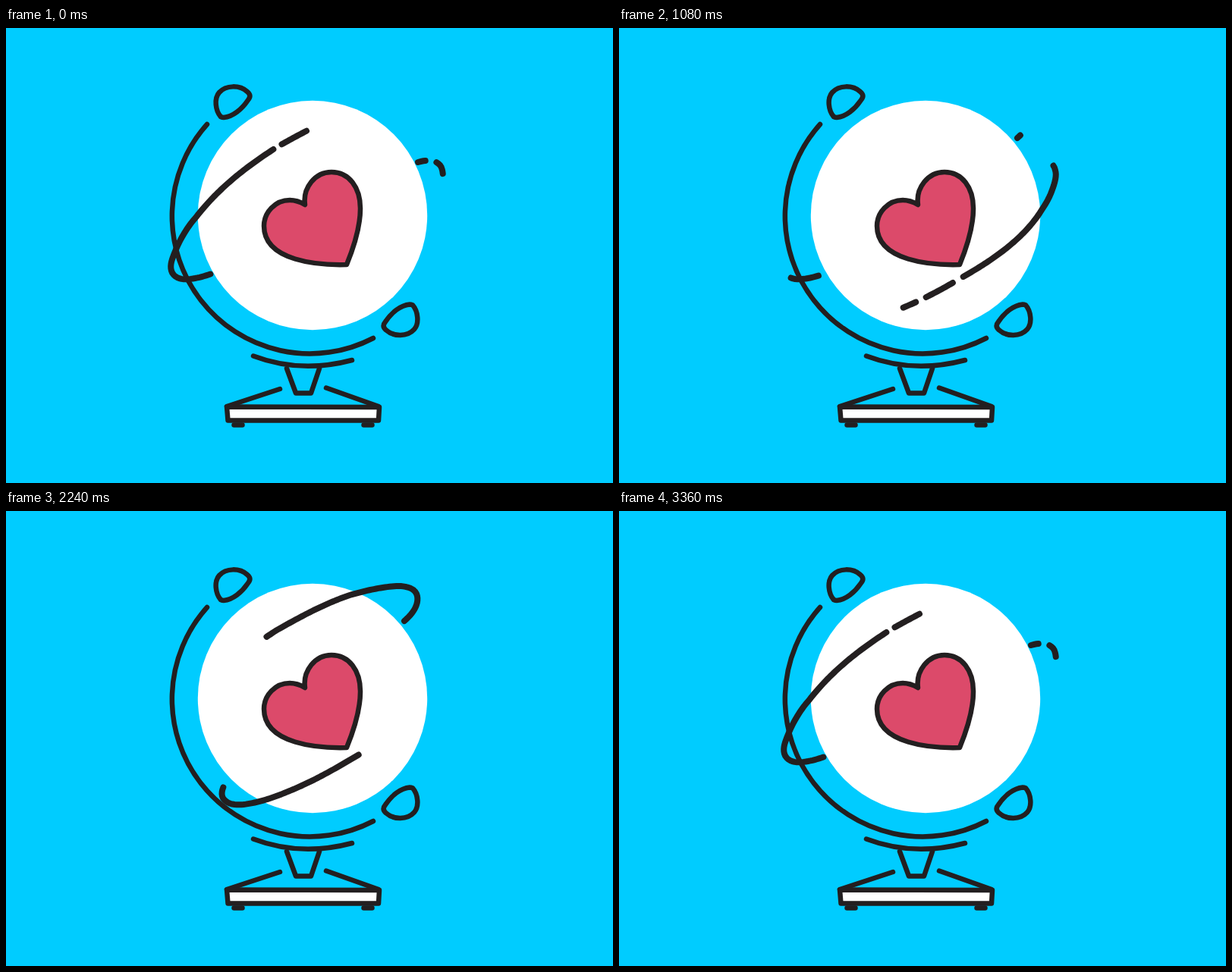
Write an HTML page that moves like this. It is 800 by 600 pixels and loops after 3.4 s.

```html
<!DOCTYPE html>
<html lang="en">
<head>
<meta charset="utf-8">
<title>Heart globe</title>
<style>
  html, body { margin: 0; width: 100%; height: 100%; overflow: hidden; background: #00ccff; }
  svg { display: block; width: 800px; height: 600px; }
  .line { fill: none; stroke: #231f20; stroke-width: 6.5; stroke-linecap: round; stroke-linejoin: round; }
  .orbit { stroke-width: 8; }
  .love { fill: #dc4a6a; }
</style>
</head>
<body>
<svg viewBox="0 0 800 600">
  <rect width="800" height="600" fill="#00ccff"/>
  <circle cx="404" cy="247" r="151.2" fill="#fff"/>
  <g class="line">
    <path d="M265 127A181.500 181.500 0 0 0 484 409"/>
    <path id="knob" d="M283 117C276 109 274 93 281 85C290 75 308 75 318 84Q324 89 319 95C311 107 299 117 287 118Q285 118 283 117Z"/>
    <use href="#knob" transform="rotate(180 409.5 241.2)"/>
    <path d="M326 432.500Q388 456 456 438"/>
    <path d="M370 449L382 481.500H402L413 449"/>
    <path d="M361 476L291 499M422 474.500L491 499"/>
    <path d="M291 499.500L492 500L491 517.500H292.500Z" fill="#fff"/>
    <path d="M300.500 523.500H311.500M471.500 523.500H482.500"/>
  </g>
  <g id="heart">
    <path class="line love" d="M394 233C391 211 407 190 429 190C452 190 467 210 467 238C467 264 458 290 449 312C413 313 340 308 340 261C340 243 355 227 374 227C382 227 389 230 394 233Z"/>
  </g>
  <path id="over" class="line orbit"/>
  <path id="under" class="line orbit"/>
</svg>
<script>
const FRAME = 40, LOOP = 3400, SPIN = 1680, BEAT = 560;
const byId = id => document.getElementById(id);

const progress = (t, start, span) => Math.min(1, Math.max(0, (t - start) / span));
const easeInOut = u => u * u * (3 - 2 * u);
const easeOut = u => 1 - (1 - u) ** 1.3;

// A track whose visible part is a list of [from, to] lengths
function makeTrack(id, d) {
  const el = byId(id);
  const guide = document.createElementNS("http://www.w3.org/2000/svg", "path");
  guide.setAttribute("d", d);
  const length = guide.getTotalLength();

  function piece([from, to]) {
    const a = Math.max(0, from), b = Math.min(length, to);
    if (b - a < 0.5) return "";
    const steps = Math.ceil((b - a) / 3), out = [];
    for (let i = 0; i <= steps; i++) {
      const p = guide.getPointAtLength(a + (b - a) * i / steps);
      out.push(p.x.toFixed(2) + " " + p.y.toFixed(2));
    }
    return "M" + out.join("L");
  }

  return { length, draw: pieces => el.setAttribute("d", pieces.map(piece).join("")) };
}

const over = makeTrack("over",
  "M271 324C254 330 241 332 232 331C220 329 214 320 219 305C224 290 234 268 250 250" +
  "C281 210 318 182 357 157C388 139.5 420 122 453 111C473 105 500 99 519 99" +
  "C538 100 544 108 542 120C540 130 533 138 525 145");

const under = makeTrack("under",
  "M292 355C285 364 282 374 287 380C293 387 302 388 313 387C330 385 350 379 369 371" +
  "C397 360 425 345 450 330C495 305 535 276 557 240C563 231 567 224 570 216" +
  "C575 203 577 194 575 188C574 182 571 179 567 177C560 174 553 174 543 177");

// One dash runs ahead of the stroke
function overPieces(t) {
  const tip = 0.465 * (t - 982);
  const tail = over.length * easeInOut(progress(t, 1640, 1190));
  return [[tail, tip - 50], [tip - 37, tip]];
}

// Two dashes trail behind the stroke
function underPieces(t) {
  const head = under.length * easeOut(progress(t, 1762, 1150));
  const tail = (under.length + 89) * easeInOut(progress(t, 2110, 1515));
  return [[tail, head], [tail - 56, tail - 16], [tail - 89, tail - 71]];
}

// A strong beat followed by a weak one
function heartScale(t) {
  const phase = (t + 20) % BEAT, half = BEAT / 2;
  const away = Math.min(phase % half, half - phase % half);
  const strong = phase < half / 2 || phase >= BEAT - half / 2;
  return 0.835 + (strong ? 0.165 : 0.083) * (1 - easeInOut(progress(away, 40, 60)));
}

function render(t) {
  const turns = [0, 1, 2].map(k => t % SPIN + k * SPIN);
  over.draw(turns.flatMap(overPieces));
  under.draw(turns.flatMap(underPieces));
  byId("heart").setAttribute("transform",
    `translate(403.5 251) scale(${heartScale(t)}) translate(-403.5 -251)`);
}

const start = performance.now();
function tick() {
  const t = (performance.now() - start) % LOOP;
  render(Math.floor(t / FRAME) * FRAME);
  requestAnimationFrame(tick);
}
tick();
</script>
</body>
</html>
```
